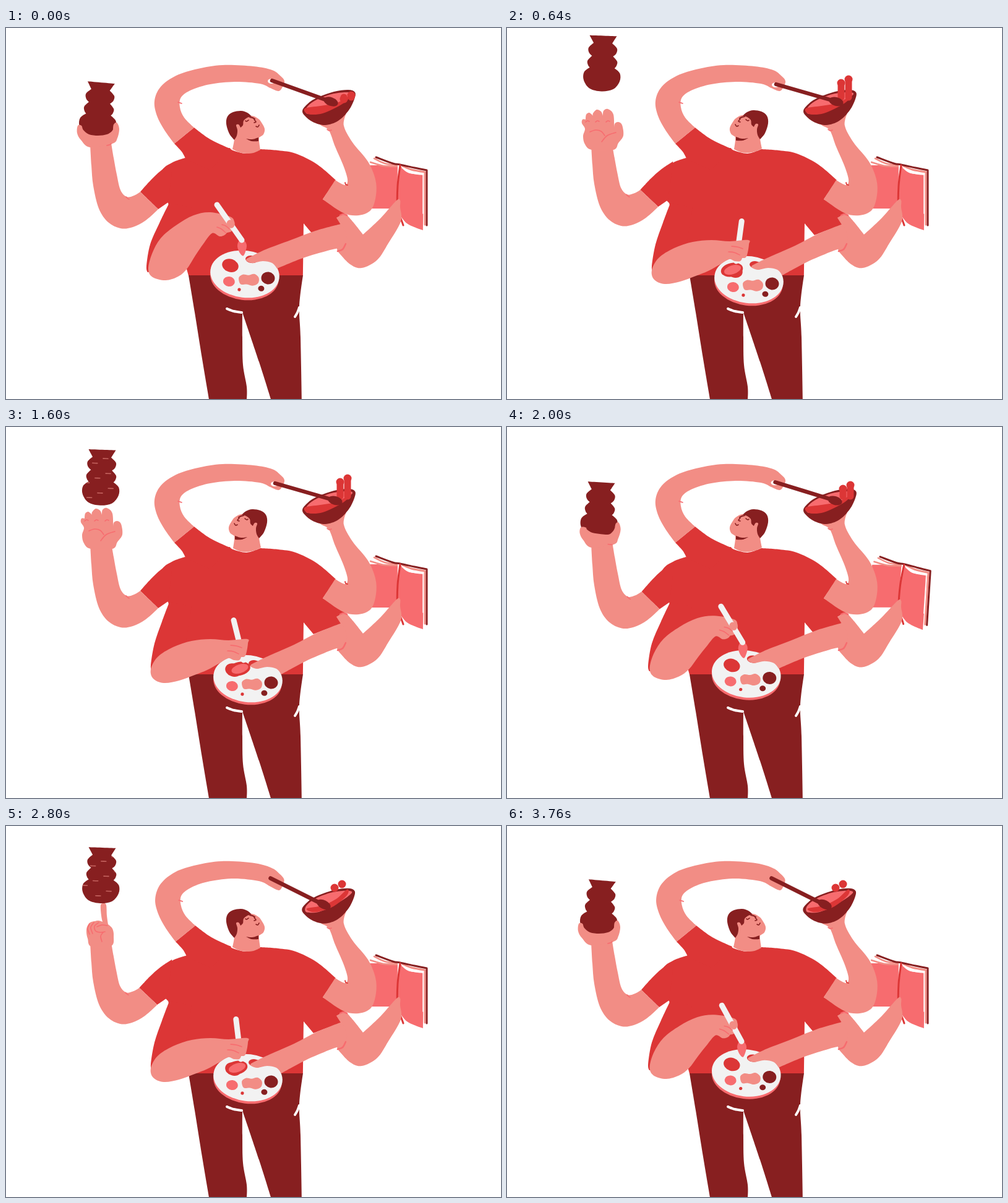
Animation of 800 by 600 pixels, one loop 3840 ms. Source, as an HTML page with a canvas:

```html
<!DOCTYPE html>
<html lang="en">
<head>
<meta charset="utf-8">
<title>Many arms</title>
<style>
html, body { margin: 0; width: 100%; height: 100%; overflow: hidden; background: #fff; }
canvas { display: block; }
</style>
</head>
<body>
<canvas id="stage" width="800" height="600"></canvas>
<script>
const ctx = document.getElementById('stage').getContext('2d');
const SKIN = '#f28d85', RED = '#dc3636', DARK = '#871f20', PINK = '#f76c6f', PALE = '#f2f2f2', WHITE = '#fff';

const clamp = x => Math.max(0, Math.min(1, x));
const lerp = (a, b, k) => a + (b - a) * k;
const linear = (from, to, t) => clamp((t - from) / (to - from));
const ease = (from, to, t) => { const u = linear(from, to, t); return u * u * (3 - 2 * u); };
const arc = (from, to, t) => Math.sin(Math.PI * linear(from, to, t));

// Points are written "x,y"; a trailing "!" makes a sharp corner.
const cache = {};
const points = s => typeof s !== 'string' ? s : cache[s] ||= s.split(' ').map(p => {
  const [x, y] = p.split(',');
  return [+x, parseFloat(y), p.endsWith('!')];
});
const warp = (shape, move) => points(shape).map(([x, y, corner]) => [...move(x, y), corner]);
function mix(a, b, k) {
  const other = points(b);
  return points(a).map(([x, y, corner], i) => [lerp(x, other[i][0], k), lerp(y, other[i][1], k), corner]);
}

function trace(shape, closed) {
  const p = points(shape), n = p.length;
  const at = i => closed ? p[(i + n) % n] : p[Math.max(0, Math.min(n - 1, i))];
  ctx.beginPath();
  ctx.moveTo(p[0][0], p[0][1]);
  for (let i = 0; i < (closed ? n : n - 1); i++) {
    const a = at(i - 1), b = at(i), c = at(i + 1), d = at(i + 2);
    const u = b[2] ? 0 : 1 / 6, v = c[2] ? 0 : 1 / 6;
    ctx.bezierCurveTo(b[0] + (c[0] - a[0]) * u, b[1] + (c[1] - a[1]) * u,
      c[0] - (d[0] - b[0]) * v, c[1] - (d[1] - b[1]) * v, c[0], c[1]);
  }
}
function fill(shape, color) {
  trace(shape, true);
  ctx.fillStyle = color;
  ctx.fill();
}
function line(shape, color, width = 1.6) {
  trace(shape, false);
  ctx.strokeStyle = color;
  ctx.lineWidth = width;
  ctx.stroke();
}
function oval(x, y, rx, ry, color, angle = 0) {
  ctx.beginPath();
  ctx.ellipse(x, y, rx, ry, angle, 0, 7);
  ctx.fillStyle = color;
  ctx.fill();
}
function placed(x, y, angle, draw) {
  ctx.save();
  ctx.translate(x, y);
  ctx.rotate(angle);
  draw();
  ctx.restore();
}

const CUP = '172,187 180,178 183,163 179,153 174,156 173,164! 170,168 163,172 149,174 134,172 125,165 122,158 116,158 115,170 121,181 136,193';
const GRIP = '174,205 178,193 187,180 189,163 186,154 181,156 178,171! 172,183 166,169 158,166 152,171 154,185 136,184 131,182 134,192 138,205';
const FINGER = '170,194 174,178 172,166 165,159! 163,145 162,128 158,125 153,128 154,145 156,155! 150,153 143,154 136,156 131,163 130,172 132,182 138,195';
const OPEN = '172,197 180,186 188,174 186,157 180,152 174,155 173,166! 172,140 163,131 156,134 155,142! 152,135 145,132 139,138 139,142! 133,137 128,140 127,148! 122,148 121,154 126,163 123,175 126,188 137,197';

const half = points('22,-45! 15,-33! 23,-25 22,-17 17,-12! 24,-4 23,3 20,7! 29,15 29,28 19,41');
const VASE = [...half, [0, 45], ...half.map(([x, y, corner]) => [-x, y, corner]).reverse()];

function vase(s) {
  placed(150 + 4 * s.air, 133 + 8 * s.crouch - 53 * s.air - 26 * s.hop, (5 - 10 * s.crouch - 3 * s.air) * Math.PI / 180, () => {
    fill(VASE, DARK);
    if (!s.spinning) return;
    trace(VASE, true);
    ctx.clip();
    for (let i = 0; i < 9; i++) {
      const x = (370 - i * 17 - s.p % 320 / 320 * 56) % 56 - 28;
      line([[x - 4, 8 * i - 31], [x + 4, 8 * i - 31]], '#c4635f');
    }
  });
}

// Lowers the left elbow while the wrist stays in place.
const flex = bend => (x, y) => [x + 3.5 * bend * linear(160, 215, x), y + 9 * bend * linear(190, 280, y)];

function vaseArm(s) {
  fill(warp('170,186! 174,210 179,237 185,262 195,273 207,271 217,265! 246,293! 226,311 205,322 185,324 165,314 150,292 141,255 138,222 136,188!', flex(s.bend)), SKIN);
  line(warp('194,273 197,276 199,277', flex(s.bend)), PINK);
  vase(s);
  if (s.p >= 800 && s.p < 1520) {
    fill(FINGER, SKIN);
    line('135,158 132,166 135,175', PINK);
    line('142,156 137,164 140,174', PINK);
    line('150,156 143,162 145,170 153,172 160,171', PINK);
    line('164,161 155,160 147,163', PINK);
    line('157,172 153,178 155,187', PINK);
  } else if (s.p >= 560 && s.p < 1680) {
    fill(OPEN, SKIN);
    line('134,168 143,165 152,167 158,174', PINK);
    line('153,184 162,174 176,169', PINK);
    for (const x of [127, 143, 160]) line([[x, 152], [x + 3, 150], [x + 6, 151]], PINK);
  } else {
    fill(mix(CUP, GRIP, s.crouch), SKIN);
    line(mix('163,190 167,189 170,187', '165,188 170,196 170,207', s.crouch), PINK);
  }
}

function book(turn) {
  // The turning book slides right, leans left and opens downwards past the spine.
  const lean = (x, y) => {
    const dx = x - 637, dy = y - 222;
    return [x + turn * (27 - .36 * dy + .08 * Math.min(0, dx)), y + turn * (4 - .08 * dy + .27 * Math.max(0, dx))];
  };
  const page = shape => fill(warp(shape, lean), PINK);
  const edge = (shape, color, width) => line(warp(shape, lean), color, width);
  page('586,222! 610,222 633,223! 632,292! 590,292!');
  page('637,222! 650,234 675,238! 674,327! 648,316 633,296! 633,255');
  edge('595,211 612,219 632,222', SKIN, 2.5);
  edge('589,217 610,223 632,224', SKIN, 2.5);
  edge('641,223 655,229 677,233! 677,318', SKIN, 3);
  edge('640,226 652,234 674,236! 674,300', WHITE, 1.5);
  edge('598,209 625,219 637,221 660,226 680,230! 680,319', DARK, 3);
  edge('637,222 633,255 633,290 642,319', turn < .6 ? RED : SKIN, turn < .6 ? 3 : 1.8);
  if (turn > .3) edge('637,222 641,262 648,300', SKIN, 1.8);
}

function bookArm(turn) {
  fill(warp('548,299! 562,315 577,334! 605,308 631,279 637,279 637,290 638,313 618,348 600,375 575,388 556,382 536,361! 530,330 534,307!',
    (x, y) => [x, y + turn * (1 + 12 * linear(590, 632, x) * linear(320, 280, y))]), SKIN);
}

// Lifts the arch of the stirring arm and drops its hand.
const arch = q => (x, y) => [
  x + q * (4 * linear(95, 135, y) - 4 * linear(95, 60, y)),
  y + q * (6 * linear(390, 440, x) * linear(150, 100, y) - 6 * linear(115, 75, y))
];

function stirArm(q) {
  fill(warp('304,161! 288,145 281,128 283,112 300,100 330,91 370,87 410,90 427,97 440,102 446,97 450,86 443,77 430,68 400,62 350,60 310,66 275,77 250,95 240,118 244,142 256,165 272,187!', arch(q)), SKIN);
  line(warp('278,120 281,121 284,122', arch(q)), PINK);
}

function food(u) {
  const x = 547 - 18 * u, y = 112 - 30 * Math.sin(Math.PI * u);
  for (const [dx, dy] of [[-1, 3], [11, -3]]) {
    oval(x + dx, y + dy, 6.5, 6.5, RED);
    if (u < .5) line([[x + dx, y + dy], [x + dx, 112]], RED, 11);
  }
}

function bowl({ q, swirl, stir }) {
  placed(-1.5 * q, 1.5 * q, 0, () => {
    fill('479,134 485,125 500,114 530,103 553,100 564,104 563,115 554,133 537,150 516,157 496,152 483,142', DARK);
    fill('484,134 488,126 502,116 526,107 549,104 560,106 551,115 531,127 507,138 488,139', PINK);
    fill(mix('483,130 508,126 535,121 558,108 545,122 512,138 488,139', '490,136 515,130 533,114 546,96 559,100 547,121 513,138', q), RED);
  });
  food(stir);
  const x1 = 430 - 5 * q + 5 * swirl, y1 = 85 - q + 6 * swirl, x2 = 522 - 23 * q + 7 * swirl, y2 = 118 + 16 * q;
  if (q < .4) oval(x1 - 1, y1 + 1, 6, 4, WHITE);
  line([[x1, y1], [x2, y2]], DARK, 6.5);
  oval(x2 + 3, y2 + 1, 12, 7, DARK, Math.atan2(y2 - y1, x2 - x1));
}

function bowlArm() {
  fill('500,152! 520,155 550,138! 546,158 560,185 585,216 597,245 598,270 590,294 570,303 545,299 512,277! 532,246! 548,254 552,245 545,222 532,192 522,166 510,158', SKIN);
  line('519,164 522,166 526,165', PINK);
  line('548,250 549,253 552,254', RED, 1.8);
}

function head(left) {
  ctx.save();
  if (left) ctx.transform(-1, 0, 0, 1, 778, -1);
  fill('376,145! 397,142 408,147 413,153 418,163 416,172 409,177! 409,183 411,197! 400,202 389,203 377,201 366,196! 369,180 370,160', SKIN);
  fill('388,179! 398,180 408,177! 408,183! 397,183', DARK);
  fill('356,155 358,143 367,136 380,134 390,137 397,143! 390,145 384,150 383,157 379,161! 376,156 372,157 374,165 373,174 369,181! 361,171', DARK);
  line('394,144 398,145 402,147', DARK, 2);
  line('387,150 389,151 392,149', DARK);
  line('401,148 404,152 401,153', DARK);
  line('404,159 407,160 409,157', DARK);
  ctx.restore();
}

function torso({ bend, q, lift }) {
  fill('290,210! 362,194! 367,198 389,203 411,196! 440,198 468,203 502,220 533,246! 512,277! 548,299! 534,307! 541,318! 497,335! 481,316! 480,400! 295,400! 262,283! 240,260! 252,230 270,217', RED);
  fill(warp('270,217! 250,231 234,246 217,265! 246,293! 262,282!', flex(bend)), RED);
  fill(warp('304,161! 330,180 362,195! 330,230! 290,211! 284,200 272,187!', arch(q)), RED);
  fill(warp('264,283! 252,315 240,350 234,385 236,395! 285,385! 300,290!', (x, y) => [x - 7 * lift * ease(275, 350, y), y]), RED);
}

function palette(lift) {
  placed(391 - 5 * lift, 407 - 9 * lift, .12, () => {
    oval(0, 5, 55.5, 37, PINK);
    oval(0, 0, 56, 38, PALE);
    oval(-25, -11, 13.5, 10.5, RED, .2);
    oval(8, -25, 10, 6, RED);
    oval(-24, 15, 9.5, 8, PINK);
    fill('-9,7 -3,1 6,1 15,-2 23,3 23,12 15,17 5,16 -5,17', SKIN);
    oval(38, 2, 11, 10, DARK);
    oval(-6, 26, 2.6, 2.6, RED);
    oval(29, 20, 5, 4.5, DARK);
  });
}

function paletteArm(lift) {
  const lower = (x, y) => {
    const w = (1 - lift) * linear(545, 440, x);
    return [x + 7 * w, y + 11 * w];
  };
  fill(warp('541,317! 500,328 460,343 420,358 397,369 388,375 398,380 415,377 430,380 438,389! 480,372 520,360 542,354 551,342 547,325', lower), SKIN);
  line('536,361 544,358 549,349', PINK, 2.5);
  line('540,303 545,301 551,303', PINK, 2.5);
}

function paintArm({ lift, stroke }) {
  const x1 = lerp(375.5 + 7.5 * stroke, 341, lift), y1 = lerp(312.5, 286, lift);
  const x2 = lerp(375 - 9 * stroke, 381, lift), y2 = lerp(377, 343, lift);
  const raised = lift > .3;
  const brush = () => line([[x1, y1], [x2, y2]], PALE, 9);
  if (raised) {
    fill([[x2 - 4, y2 + 1], [x2 + 4, y2 + 1], [x2 + 8, y2 + 10], [x2 + 3, y2 + 25], [x2 - 3, y2 + 21], [x2 - 7, y2 + 10]], PINK);
  } else {
    oval(x2 - 7, 391, 18, 11, RED, -.2);
    oval(x2 - 6, 391, 14, 7, PINK, -.3);
    brush();
  }
  fill(mix('390,343 360,345 330,343 300,346 270,356 245,372 234,392 238,407 255,414 280,410 305,401 325,393 345,382 359,374 368,377 377,377 380,372! 386,371 389,363 391,350',
    '362,305 330,298 303,303 275,319 250,340 236,365 230,390 237,403 258,408 278,402 292,390 306,368 319,349 333,332 345,337 353,335 357,331! 364,329 369,321 369,313', lift), SKIN);
  if (raised) {
    brush();
    oval(lerp(380, 363, lift), lerp(350, 317, lift), 6, 7, SKIN, -.6);
  }
  line(mix('363,353 372,354 381,357', '349,318 355,320 361,325', lift), PINK);
  line(mix('358,362 367,363 376,367', '341,322 348,325 355,331', lift), PINK);
}

function pants() {
  fill('295,400! 480,400! 474,450 476,500 478,600! 428,600! 409,540 382,460! 382,500 383,545 389,580 389,600! 328,600! 317,535 305,460', DARK);
  line('357,454 368,458 381,460', WHITE, 4);
  line('474,452 471,460 467,467', WHITE, 4);
}

// All motion repeats every 1920 ms, the stirring every 480 ms; the head turns once per half.
function pose(raw) {
  const hold = raw >= 560 && raw < 800 ? 40 : 80;
  const p = Math.floor(raw / hold) * hold;
  const beat = Math.floor(raw / 80) * 80 % 480;
  const crouch = linear(0, 480, p) * (1 - ease(480, 600, p));
  const air = ease(460, 600, p) * (1 - ease(1580, 1760, p));
  return {
    p, crouch, air,
    hop: arc(520, 880, p),
    bend: crouch - .45 * air + .6 * arc(1520, 1840, p),
    spinning: p >= 800 && p < 1680,
    turn: ease(0, 300, p) * (1 - ease(340, 560, p)),
    lift: 1 - ease(0, 320, p) + ease(1600, 1920, p),
    stroke: -Math.cos(2 * Math.PI * (p - 960) / (p < 960 ? 480 : 640)),
    stir: beat / 480,
    q: ease(160, 320, beat) * (1 - ease(320, 480, beat)),
    swirl: arc(0, 320, beat)
  };
}

function draw(time) {
  const t = time % 3840, s = pose(t % 1920);
  ctx.fillStyle = WHITE;
  ctx.fillRect(0, 0, 800, 600);
  ctx.lineCap = ctx.lineJoin = 'round';
  pants();
  const layers = [book, bookArm];
  if (s.turn > .5) layers.reverse();
  for (const layer of layers) layer(s.turn);
  torso(s);
  stirArm(s.q);
  head(t >= 640 && t < 2560);
  vaseArm(s);
  palette(s.lift);
  paintArm(s);
  paletteArm(s.lift);
  bowlArm();
  bowl(s);
}

function loop() {
  draw(performance.now());
  requestAnimationFrame(loop);
}
loop();
</script>
</body>
</html>
```
